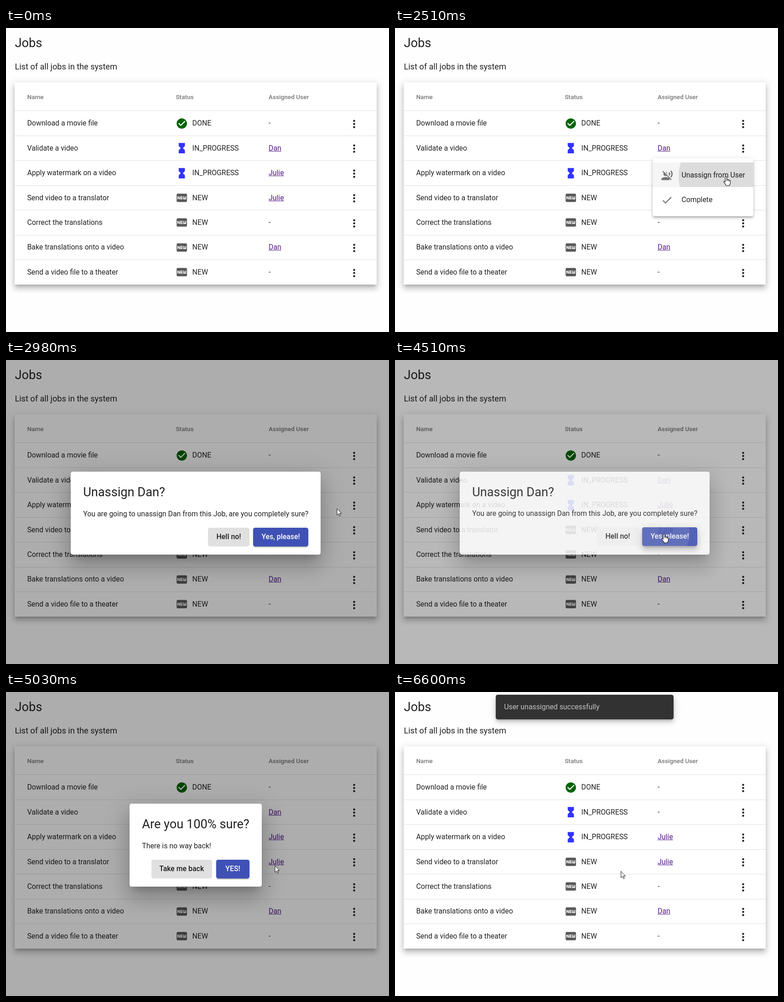
An HTML page for the animation above (9210 ms loop, 840 px wide and 667 px high).

```html
<!DOCTYPE html>
<html lang="en">
<head>
<meta charset="utf-8">
<title>Jobs</title>
<style>
html, body { margin: 0; width: 100%; height: 100%; overflow: hidden; background: #fefefe; }
#stage { position: relative; width: 840px; height: 667px; overflow: hidden;
  font: 400 15.87px Roboto, Arial, sans-serif; color: rgba(0,0,0,.87); }
#stage div, #stage svg { position: absolute; }
#stage svg { overflow: visible; }
.text { white-space: pre; height: 30px; line-height: 30px; }
.head { font-size: 13.6px; font-weight: 500; color: rgba(0,0,0,.54); }
.link { color: #551a8b; text-decoration: underline; }
.line { left: 0; width: 794px; height: 1px; background: rgba(0,0,0,.12); }
.card { background: #fff; border-radius: 4.5px; }
.clip { overflow: hidden; }
.fill { inset: 0; }
.ripple { border-radius: 50%; }
.button { height: 40.8px; line-height: 40.8px; border-radius: 4.5px; text-align: center; font-weight: 500; }
.primary { background: #3f51b5; color: #fff; }
.focus { inset: 0; border-radius: 4.5px; background: rgba(0,0,0,.12); }
.label { inset: 0; }
</style>
</head>
<body>
<div id="stage"></div>
<script>
const LOOP = 9210, ZOOM = 1.1333;
const OUT = 'cubic-bezier(0,0,.2,1)', STD = 'cubic-bezier(.4,0,.2,1)', SWIFT = 'cubic-bezier(.25,.8,.25,1)';
const stage = document.getElementById('stage');

const ICONS = {
  DONE: ['#006400', 'M12 2C6.48 2 2 6.48 2 12s4.48 10 10 10 10-4.48 10-10S17.52 2 12 2zm-2 15l-5-5 1.41-1.41L10 14.17l7.59-7.59L19 8l-9 9z'],
  IN_PROGRESS: ['#3333ff', 'M6 2v6h.01L6 8.01 10 12l-4 4 .01.01H6V22h12v-5.99h-.01L18 16l-4-4 4-3.99-.01-.01H18V2H6z'],
  NEW: ['#585858', 'M20 4H4c-1.11 0-1.99.89-1.99 2L2 18c0 1.11.89 2 2 2h16c1.11 0 2-.89 2-2V6c0-1.11-.89-2-2-2zM8.5 15H7.3l-2.55-3.5V15H3.5V9h1.2l2.6 3.5V9h1.2v6zm5-4.74H11v1.12h2.5v1.26H11v1.11h2.5V15h-4V9h4v1.26zm7 3.74c0 .55-.45 1-1 1h-4c-.55 0-1-.45-1-1V9h1.25v4.51h1.13V9.99h1.25v3.51h1.12V9h1.25v5z'],
  more: ['#212121', 'M12 8a2 2 0 1 0 0-4 2 2 0 0 0 0 4zm0 2a2 2 0 1 0 0 4 2 2 0 0 0 0-4zm0 6a2 2 0 1 0 0 4 2 2 0 0 0 0-4z'],
  mute: ['#757575', 'M12.99 9.18c0-.06.01-.12.01-.18 0-2.21-1.79-4-4-4-.06 0-.12.01-.18.01l4.17 4.17zm-6.1-3.56L4.27 3 3 4.27l2.62 2.62C5.23 7.5 5 8.22 5 9c0 2.21 1.79 4 4 4 .78 0 1.5-.23 2.11-.62L19.73 21 21 19.73l-8.62-8.62-5.49-5.49zM9 15c-2.67 0-8 1.34-8 4v2h16v-2c0-2.66-5.33-4-8-4zm7.76-9.64l-1.68 1.69c.84 1.18.84 2.71 0 3.89l1.68 1.69c2.02-2.02 2.02-5.07 0-7.27zM20.07 2l-1.63 1.63c2.77 3.02 2.77 7.56 0 10.74L20.07 16c3.9-3.89 3.91-9.95 0-14z'],
  tick: ['#757575', 'M9 16.2L4.8 12l-1.4 1.4L9 19 21 7l-1.4-1.4L9 16.2z']
};

// Elevation layers: [offset, blur, spread]
const LEVELS = {
  2: [[3, 1, -2], [2, 2, 0], [1, 5, 0]],
  4: [[2, 4, -1], [4, 5, 0], [1, 10, 0]],
  6: [[3, 5, -1], [6, 10, 0], [1, 18, 0]],
  8: [[5, 5, -3], [8, 10, 1], [3, 14, 2]],
  24: [[11, 15, -7], [24, 38, 3], [9, 46, 8]]
};
const shadow = level => LEVELS[level].map((layer, i) =>
  `0 ${layer.map(v => (v * ZOOM).toFixed(2) + 'px').join(' ')} rgba(0,0,0,${[.2, .14, .12][i]})`).join(',');

function box(parent, cls, style = {}, content = '') {
  const el = document.createElement('div');
  el.className = cls;
  for (const k in style) el.style[k] = typeof style[k] === 'number' ? style[k] + 'px' : style[k];
  el.textContent = content;
  return parent.appendChild(el);
}

const text = (parent, x, midY, content, cls = '', style = {}) =>
  box(parent, 'text ' + cls, { left: x, top: midY - 15, ...style }, content);

function vector(parent, x, y, size, view, inner) {
  const holder = document.createElement('template');
  holder.innerHTML = `<svg width="${size}" height="${size}" viewBox="0 0 ${view} ${view}" style="left:${x}px;top:${y}px">${inner}</svg>`;
  return parent.appendChild(holder.content.firstChild);
}

function icon(parent, name, midX, midY) {
  const size = 24 * ZOOM, [color, path] = ICONS[name];
  return vector(parent, midX - size / 2, midY - size / 2, size, 24, `<path fill="${color}" d="${path}"/>`);
}

// Steps: [time, value, easing towards the next step]
function track(el, prop, ...steps) {
  const key = ([t, v, easing = 'linear']) => ({ offset: t / LOOP, [prop]: v, easing });
  const last = steps[steps.length - 1];
  el.animate([key([0, steps[0][1]]), ...steps.map(key), key([LOOP, last[1]])],
    { duration: LOOP, iterations: Infinity });
}

const show = (el, from, to) => track(el, 'opacity', [from, 0], [from, 1], [to, 1], [to, 0]);

function ripple(parent, x, y, r, color, start, time, end) {
  const el = box(parent, 'ripple', { left: x - r, top: y - r, width: 2 * r, height: 2 * r, background: color });
  track(el, 'transform', [start, 'scale(0)', OUT], [start + time, 'scale(1)']);
  track(el, 'opacity', [end, 1], [end + 150, 0]);
}

// Page
text(stage, 19.4, 33, 'Jobs', '', { fontSize: '27.2px' });
text(stage, 19.4, 85, 'List of all jobs in the system', '', { fontSize: '18.13px' });
const card = box(stage, 'card', { left: 19, top: 119, width: 794, height: 444, borderRadius: 0, boxShadow: shadow(8) });
[['Name', 46.4], ['Status', 372.4], ['Assigned User', 576]].forEach(([s, x]) => text(stage, x, 151, s, 'head'));

const JOBS = [
  ['Download a movie file', 'DONE', '-'],
  ['Validate a video', 'IN_PROGRESS', 'Dan'],
  ['Apply watermark on a video', 'IN_PROGRESS', 'Julie'],
  ['Send video to a translator', 'NEW', 'Julie'],
  ['Correct the translations', 'NEW', '-'],
  ['Bake translations onto a video', 'NEW', 'Dan'],
  ['Send a video file to a theater', 'NEW', '-']
];
JOBS.forEach(([name, status, user], i) => {
  const y = 209.3 + 54.42 * i;
  box(card, 'line', { top: Math.round(62.4 + 54.45 * i) });
  text(stage, 46.4, y, name);
  icon(stage, status, 386, y);
  text(stage, 408.6, y, status);
  const cell = text(stage, 576, y, user, user === '-' ? '' : 'link');
  if (i === 1) {
    track(cell, 'opacity', [6450, 1], [6450, 0]);
    show(text(stage, 576, y, '-'), 6450, LOOP);
  }
  icon(stage, 'more', 763.2, y + 1.3);
});
ripple(stage, 763.2, 265, 22.7, 'rgba(0,0,0,.1)', 1090, 225, 1200);

// Row menu
const menu = box(stage, 'card', { left: 565, top: 286, width: 221, height: 127, boxShadow: shadow(4), transformOrigin: '100% 0' });
track(menu, 'opacity', [1100, 0, OUT], [1220, 1], [2535, 1], [2640, 0]);
track(menu, 'transform', [1100, 'scale(.8)', OUT], [1220, 'scale(1)']);
const item = box(menu, 'clip', { left: 0, top: 9, width: 221, height: 54.4 });
show(box(item, 'fill', { background: 'rgba(0,0,0,.04)' }), 1985, 2700);
ripple(item, 162, 31, 165, 'rgba(0,0,0,.1)', 2445, 225, 2700);
icon(menu, 'mute', 31.6, 37.5);
icon(menu, 'tick', 31.6, 91.5);
text(menu, 63.4, 37, 'Unassign from User');
text(menu, 63.4, 91.2, 'Complete');

// Confirmation dialogs
function dialog(d) {
  const { open, close, press } = d;
  const shade = box(stage, 'fill', { background: 'rgba(0,0,0,.32)' });
  track(shade, 'opacity', [open, 0, SWIFT], [open + 400, 1], [close, 1, SWIFT], [close + 400, 0]);

  const panel = box(stage, 'card', { left: d.x, top: 244.7, width: d.w, height: 182, boxShadow: shadow(24) });
  track(panel, 'opacity', [open, 0, OUT], [open + 150, 1], [close, 1, STD], [close + 75, 0]);
  track(panel, 'transform', [open, 'scale(.7)', OUT], [open + 150, 'none']);
  text(panel, 27.2, 45.3, d.title, '', { fontSize: '27.2px' });

  const rest = box(panel, 'fill');
  track(rest, 'transform', [press, 'none'], [press, 'translateY(-1px)']);
  text(rest, 27.2, 93.3, d.body);

  const [noX, noW] = d.no, [yesX, yesW] = d.yes;
  const no = box(rest, 'button', { left: noX - d.x, top: 123, width: noW });
  const focus = box(no, 'focus');
  track(focus, 'opacity', [open + 100, 0], [open + 250, 1], [press, 1], [press + 90, .1], [press + 150, 0]);
  box(no, 'label', {}, d.noText);

  const yes = box(rest, 'button primary', { left: yesX - d.x, top: 123, width: yesW, boxShadow: shadow(2) });
  track(yes, 'boxShadow', [press, shadow(2), STD], [press + 100, shadow(8)]);
  const face = box(yes, 'fill clip', { borderRadius: 4.5 });
  const [rx, ry, r, time] = d.ripple;
  ripple(face, rx - yesX, ry - 367, r, 'rgba(255,255,255,.1)', press, time, close + 200);
  box(yes, 'label', {}, d.yesText);
}

dialog({
  x: 142, w: 548.3, open: 2560, close: 4495, press: 4431,
  title: 'Unassign Dan?',
  body: 'You are going to unassign Dan from this Job, are you completely sure?',
  no: [443.3, 90.5], noText: 'Hell no!',
  yes: [542.3, 120.7], yesText: 'Yes, please!',
  ripple: [591, 382, 78, 225]
});
dialog({
  x: 271.2, w: 290, open: 4570, close: 6260, press: 6200,
  title: 'Are you 100% sure?',
  body: 'There is no way back!',
  no: [318.7, 133.5], noText: 'Take me back',
  yes: [461.5, 72.5], yesText: 'YES!',
  ripple: [495.5, 393, 47, 430]
});

// Notice
const notice = box(stage, 'card', { left: 221, top: 6, width: 390, height: 54, background: '#323232', boxShadow: shadow(6) });
track(notice, 'opacity', [6450, 0, OUT], [6600, 1]);
track(notice, 'transform', [6450, 'scale(.8)', OUT], [6600, 'scale(1)']);
text(notice, 18.2, 27.2, 'User unassigned successfully', '', { color: 'rgba(255,255,255,.7)' });

// Pointer
const pointer = box(stage, '', { left: 0, top: 0 });
const at = (x, y) => `translate(${x}px,${y}px)`;
track(pointer, 'opacity', [120, 0], [120, 1]);
track(pointer, 'transform',
  [120, at(741, 646), 'ease-in'], [560, at(770, 430), 'ease-out'], [1020, at(767, 255)],
  [1590, at(767, 255), 'ease-in-out'], [2300, at(726, 326)],
  [3820, at(726, 326), 'ease-in-out'], [4350, at(590, 381.3)],
  [5400, at(590, 381.3), 'ease-in-out'], [5770, at(495.6, 393.2)]);

const ink = 'fill="#fff" stroke="#111" stroke-linejoin="round"';
const arrow = vector(pointer, 0, 0, 24, 24, `<path ${ink} d="M0 0V14.4L3.3 11.3L5.6 16.4L7.7 15.5L5.5 10.4H9.6Z"/>`);
const hand = vector(pointer, 0, 0, 24, 24, `<path ${ink} stroke-width="1.1" d="M-1.7 12V1.6a1.65 1.65 0 0 1 3.3 0V7C2 6 4.5 6 4.6 7.6C5.2 6.8 7.3 7 7.4 8.5C8 7.9 9.4 8.4 9.4 10V14C9.4 16 7.9 17 7.9 19.7H.2C.2 17.5-4.9 13-4.9 11.2C-4.6 9.6-2.8 10-1.7 12Z"/>
  <path fill="none" stroke="#111" stroke-width=".9" d="M1.6 7V10M4.6 7.8V10.4M7.4 8.6V10.8"/>`);
const overLink = [[850, 1140], [1985, 2600], [4190, 4570], [5615, 6340]];
const shape = (el, on) => track(el, 'opacity', ...overLink.flatMap(([a, b]) =>
  [[a, 1 - on], [a, on], [b, on], [b, 1 - on]]));
shape(hand, 1);
shape(arrow, 0);
</script>
</body>
</html>
```
